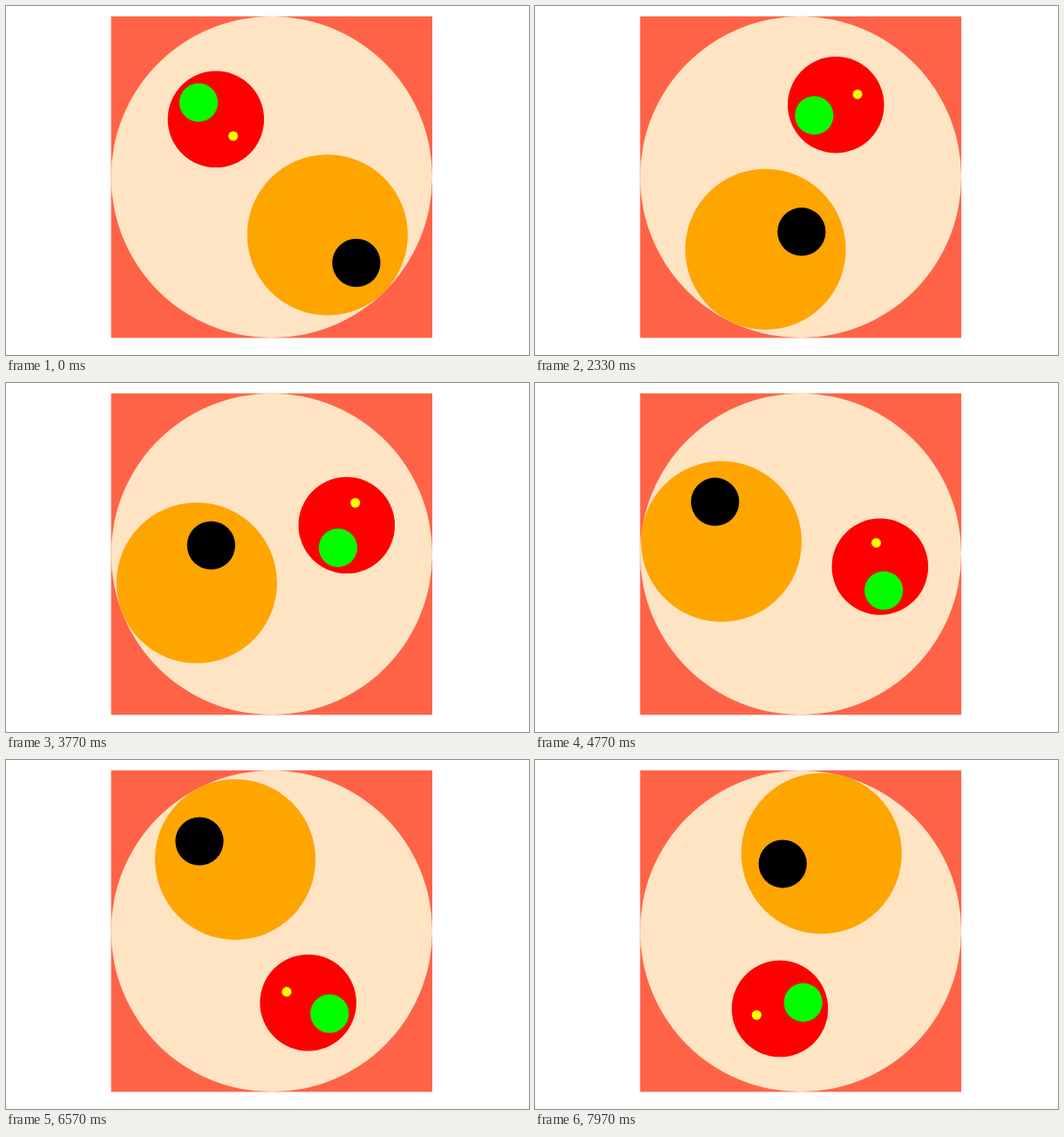
An HTML page with a canvas that plays this animation: 600 by 400 pixels, repeating every 8000 ms.

```html
<!DOCTYPE html>
<html lang="en">
<head>
<meta charset="utf-8">
<title>Rolling circles</title>
<style>
  html, body { margin: 0; width: 100%; height: 100%; overflow: hidden; background: #fff; }
  canvas { display: block; }
</style>
</head>
<body>
<canvas id="stage" width="600" height="400"></canvas>
<script>
const ctx = document.getElementById('stage').getContext('2d');
const LOOP = 8000;
const R = 184.25;
const center = { x: 304.8, y: 196.1 };

// Sizes and distances are fractions of the large radius.
function disc(p, size, color) {
  ctx.fillStyle = color;
  ctx.beginPath();
  ctx.arc(p.x, p.y, size * R, 0, 2 * Math.PI);
  ctx.fill();
}

function orbit(p, dist, degrees) {
  const a = degrees * Math.PI / 180;
  return { x: p.x + dist * R * Math.cos(a), y: p.y + dist * R * Math.sin(a) };
}

// 30 steps per second, with step times rounded to 10 ms.
function stepAt(ms) {
  return Math.floor((3 * Math.floor(ms / 10) + 1.5) / 10);
}

function draw(ms) {
  const step = stepAt(ms);
  const outer = 46 + step;
  const inner = 44 - step;

  ctx.fillStyle = '#fff';
  ctx.fillRect(0, 0, 600, 400);
  ctx.fillStyle = '#ff6347';
  ctx.fillRect(center.x - R, center.y - R, 2 * R, 2 * R);
  disc(center, 1, '#ffe4c4');

  const big = orbit(center, 0.5, outer);
  disc(big, 0.5, '#ffa500');
  disc(orbit(big, 0.25, inner), 0.15, '#000');

  const small = orbit(center, 0.5, outer + 180);
  disc(small, 0.3, '#f00');
  disc(orbit(small, 0.15, inner + 180), 0.12, '#0f0');
  disc(orbit(small, 0.15, inner), 0.03, '#ff0');
}

const start = performance.now();

function tick() {
  draw((performance.now() - start) % LOOP);
  requestAnimationFrame(tick);
}

tick();
</script>
</body>
</html>
```
